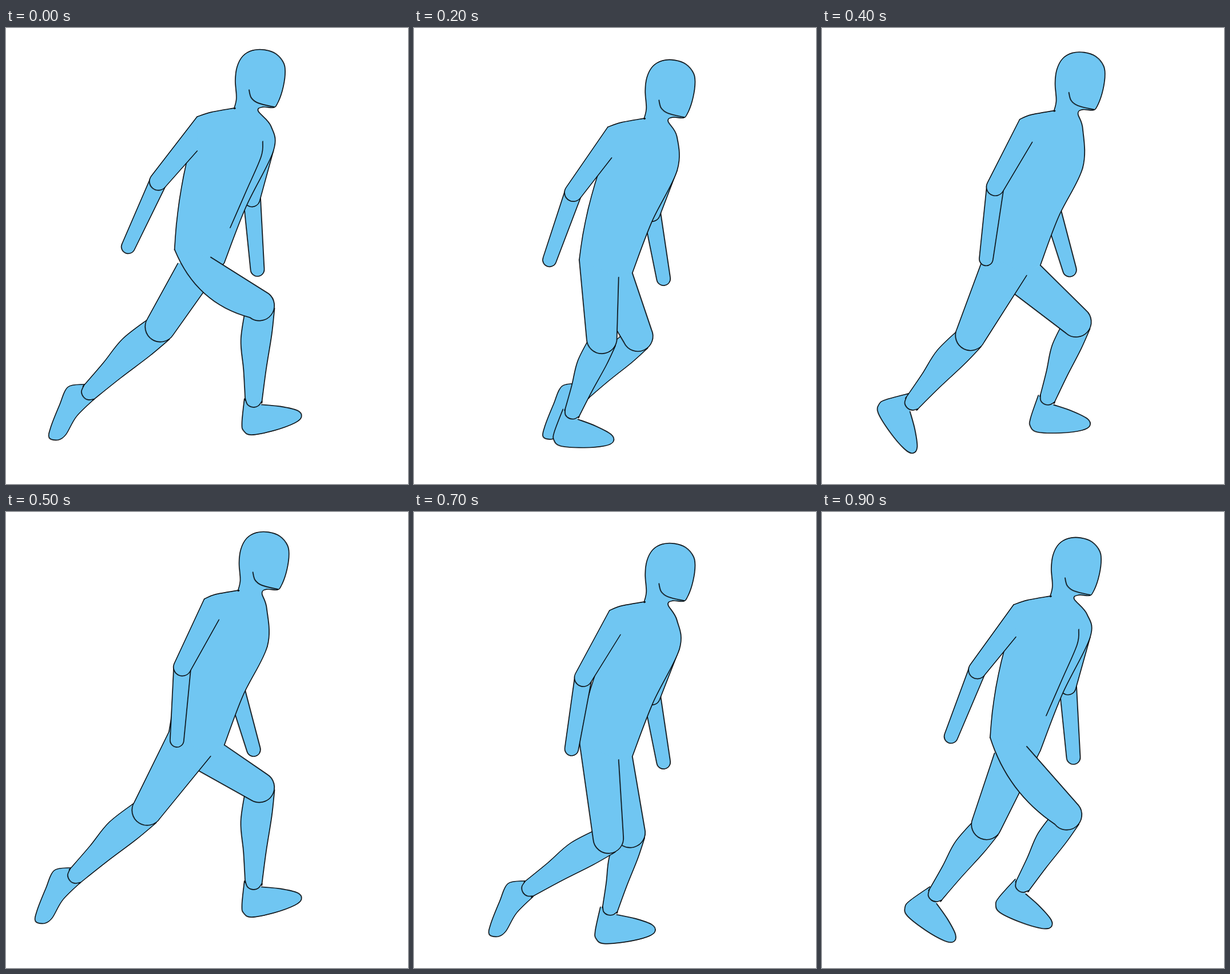
Write an HTML page with a canvas that moves like this. It is 703 px wide and 797 px high and loops after 1000 ms.

```html
<!DOCTYPE html>
<html lang="en">
<head>
<meta charset="utf-8">
<title>Run cycle</title>
<style>
html, body { margin: 0; width: 100%; height: 100%; overflow: hidden; background: #fff; }
canvas { display: block; }
</style>
</head>
<body>
<canvas id="stage" width="703" height="797"></canvas>
<script>
const ctx = document.getElementById('stage').getContext('2d');
const STEP = 100, POSES = 10;

// key poses of each leg: knee x, y, ankle x, y; poses between them are blended
const KEYS = [0, 1, 3, 5, 6, 7, 9];
const NEAR_LEG = [[443, 485, 433, 648], [384, 532, 358, 668], [273, 553, 194, 673],
  [247, 521, 123, 634], [290, 552, 153, 645], [340, 570, 203, 657], [428, 529, 351, 651]];
const FAR_LEG = [[270, 522, 147, 635], [337, 531, 240, 621], [446, 546, 355, 646],
  [443, 481, 433, 645], [410, 512, 387, 664], [378, 560, 342, 692], [288, 546, 199, 667]];

// head from throat to nape
const HEAD = [[442, 145], [450, 138], [468, 139], [475, 133], [484, 110], [489, 82], [487, 62],
  [473, 45], [453, 38], [432, 39], [415, 49], [405, 68], [402, 92], [404, 122], [400, 140], [399, 140]];
const JAW = [[426, 108], [430, 122], [442, 131], [470, 138]];
const RIBS = [[450, 198], [447, 225], [421, 285], [393, 349]];

// feet relative to the ankle
const PLANTED = [[-16, 0], [-20, 42], [-17, 56], [-3, 63], [37, 55], [72, 42], [84, 31],
  [77, 20], [47, 13], [14, 10]];
const LIFTED = [[-10, -12], [-39, -6], [-52, 25], [-66, 65], [-68, 84], [-52, 87],
  [-39, 77], [-22, 45], [6, 15]];

// shin as distance along and across the bone
const SHIN = 167;
const CALF = [[5, 24], [63, 29], [116, 21], [167, 15]];
const ANKLE = [[167, 15], [178, 10], [182, 0], [179, -9], [170, -15]];
const FRONT = [[170, -15], [112, -19], [49, -25], [3, -27]];

const wave = n => Math.cos(2 * Math.PI * n / POSES);
const mid = (a, b) => [(a[0] + b[0]) / 2, (a[1] + b[1]) / 2];
const angle = (a, b) => Math.atan2(b[1] - a[1], b[0] - a[0]);
const polar = (p, t, r) => [p[0] + r * Math.cos(t), p[1] + r * Math.sin(t)];

// smooth path through every point
function curve(pts) {
  const path = new Path2D();
  path.moveTo(...pts[0]);
  for (let i = 0; i < pts.length - 1; i++) {
    const b = pts[i], c = pts[i + 1], a = pts[i - 1] || b, d = pts[i + 2] || c;
    path.bezierCurveTo(b[0] + (c[0] - a[0]) / 6, b[1] + (c[1] - a[1]) / 6,
      c[0] - (d[0] - b[0]) / 6, c[1] - (d[1] - b[1]) / 6, ...c);
  }
  return path;
}

// one firm line and a faint second one
function ink(path) {
  ctx.lineWidth = 1.4;
  ctx.stroke(path);
  ctx.save();
  ctx.translate(-0.8, 0.7);
  ctx.lineWidth = 0.5;
  ctx.stroke(path);
  ctx.restore();
}

function paint(path) {
  ctx.fill(path);
  ink(path);
}

// open at back and front, round at the end
function limb(back, front, end, r, bulge = 0) {
  const t = angle(mid(back, front), end), side = t + Math.PI / 2;
  const tip = polar(end, side, r);
  const path = new Path2D();
  path.moveTo(...back);
  path.quadraticCurveTo(...polar(mid(back, tip), side, bulge), ...tip);
  path.arc(...end, r, side, t - Math.PI / 2, true);
  path.lineTo(...front);
  paint(path);
}

function forearm(elbow, hand) {
  const side = angle(elbow, hand) + Math.PI / 2;
  limb(polar(elbow, side, 15), polar(elbow, side, -15), hand, 12);
}

// the heel rises as the shin leans, until the foot leaves the ground
function foot([x, y], lean) {
  const up = lean > 0.9, turn = up ? 0.04 : 1.6 * lean * lean;
  const c = Math.cos(turn), s = Math.sin(turn);
  paint(curve((up ? LIFTED : PLANTED).map(([u, v]) => [x + u * c - v * s, y + u * s + v * c])));
}

function shin(knee, ankle) {
  const t = angle(knee, ankle), k = Math.hypot(ankle[0] - knee[0], ankle[1] - knee[1]) / SHIN;
  const place = ([u, v]) => polar(polar(knee, t, u * k), t + Math.PI / 2, v > 0 ? v * k : v);
  paint(curve([...CALF, ...ANKLE, ...FRONT].map(place)));
}

function leg([knee, ankle], back, front, bulge) {
  foot(ankle, (knee[0] - ankle[0]) / (ankle[1] - knee[1]));
  shin(knee, ankle);
  limb(back, front, knee, 26.5, bulge);
}

function legPose(keys, n) {
  const i = KEYS.findLastIndex(k => k <= n), j = (i + 1) % KEYS.length;
  const f = i === j || KEYS[i] === n ? 0 : (n - KEYS[i]) / (KEYS[j] - KEYS[i]);
  const [kx, ky, ax, ay] = keys[i].map((v, c) => v + (keys[j][c] - v) * f);
  return [[kx, ky], [ax, ay]];
}

function draw(n) {
  // the whole trunk bobs twice per cycle; at() places points on it
  const dx = 2.5 - 3.5 * wave(n + 0.5), dy = 9 - 10.5 * wave(2 * n) + 1.5 * wave(n);
  const at = (x, y) => [x + dx, y + dy];
  const twist = wave(n + 1), swing = wave(n - 0.3), farSwing = wave(n + 0.5);

  const shoulder = at(338 - 3 * swing, 155);
  const armpit = at(351 - 16 * swing, 203 + 12 * swing);
  const elbow = at(285 - 18 * swing, 271 - 3 * swing);
  const hand = at(254 - 40 * swing, 392 - 10 * swing);
  const farElbow = at(414 + 18 * farSwing, 306 - 8 * farSwing);
  const farHand = at(434 + 7 * farSwing, 420 + 2 * farSwing);

  const near = legPose(NEAR_LEG, n), far = legPose(FAR_LEG, n);
  const reach = near[0][0] - 345, farReach = far[0][0] - 275;
  const belly = [462.5 + 6.5 * twist, 226 - 14 * twist + dy];
  const crotch = [382, 410 + dy];
  const hip = [290 + reach * 0.05, 387 + dy];
  const thigh = [358, 415 - reach * 0.15 + dy];

  ctx.fillStyle = '#fff';
  ctx.fillRect(0, 0, 703, 797);
  ctx.fillStyle = '#70c6f2';
  ctx.strokeStyle = '#0b0f12';
  ctx.lineJoin = ctx.lineCap = 'round';

  forearm(farElbow, farHand);
  limb([belly[0] - 24, belly[1] - 15], belly, farElbow, 14);
  leg(far, [301 + farReach * 0.06, 412 + farReach * 0.17 + dy], crotch);

  const waist = mid(belly, crotch);
  const outline = curve([crotch, [waist[0] - 5, waist[1]], belly, [460 + 4 * farSwing, 172 + dy],
    ...HEAD.map(p => at(...p)), at(360, 147), shoulder]);
  const back = new Path2D();
  const top = [armpit[0] - 14, armpit[1]], bend = [299, (armpit[1] + hip[1]) / 2];
  back.moveTo(...top);
  back.quadraticCurveTo(...bend, ...hip);
  const trunk = new Path2D(outline);
  trunk.lineTo(...top);
  trunk.quadraticCurveTo(...bend, ...hip);
  trunk.lineTo(338, 432 + dy);
  ctx.fill(trunk);
  ink(outline);
  ink(back);
  ink(curve(JAW.map(p => at(...p))));
  if (wave(n) > 0.5) ink(curve(RIBS.map(p => at(...p))));

  leg(near, hip, thigh, Math.max(0, reach - 39) * 0.75);
  forearm(elbow, hand);
  limb(shoulder, armpit, elbow, 15.5);
}

const start = performance.now();
function tick() {
  draw(Math.floor((performance.now() - start) / STEP) % POSES);
  requestAnimationFrame(tick);
}
tick();
</script>
</body>
</html>
```
